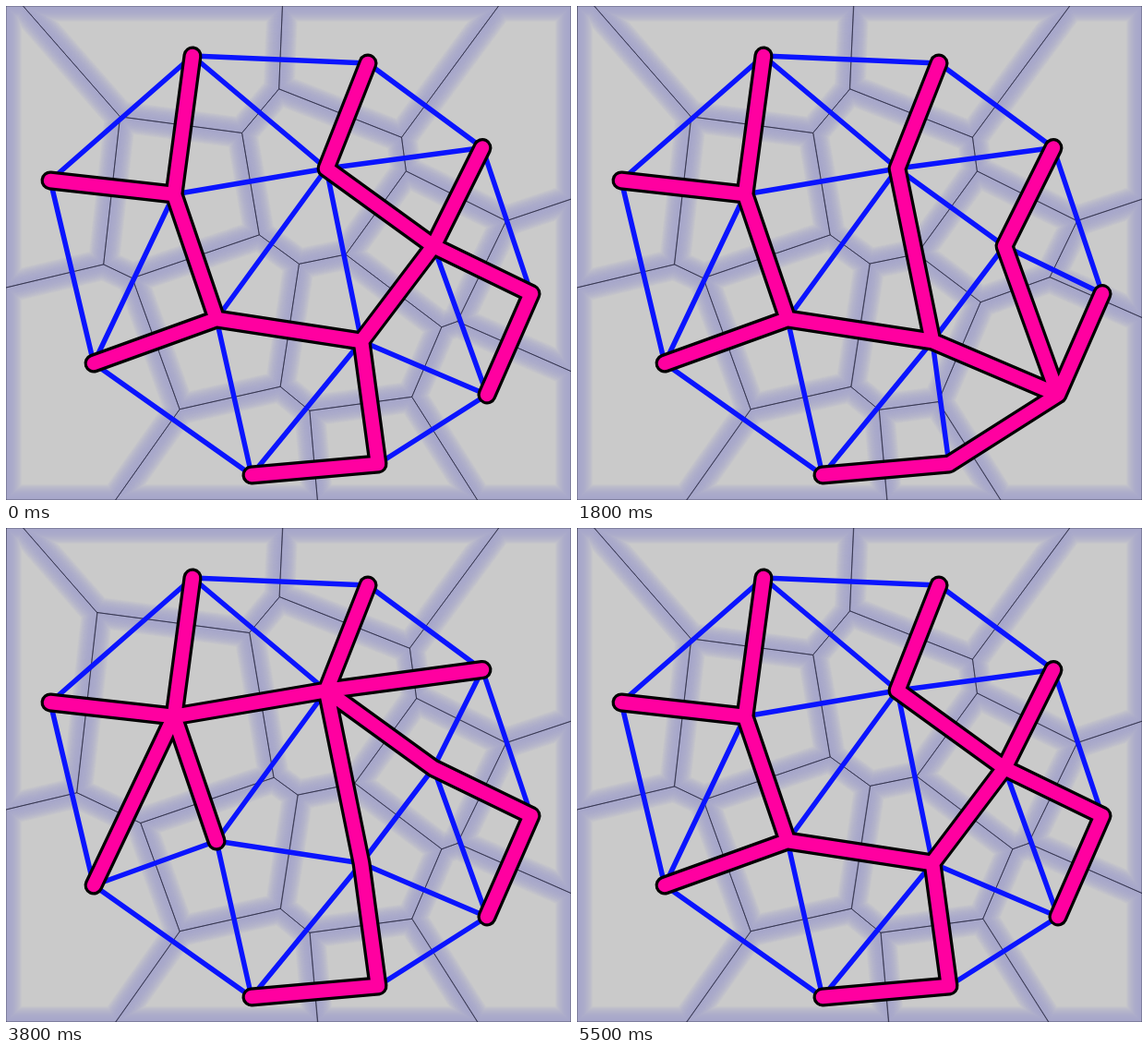
An HTML page with a canvas that plays this animation: 612x535 px, repeating every 6100 ms.

```html
<!DOCTYPE html>
<html lang="en">
<head>
<meta charset="utf-8">
<title>Weighted Voronoi cells with spanning tree</title>
<style>
  html, body { margin: 0; width: 100%; height: 100%; overflow: hidden; background: #cacaca; }
  canvas { display: block; }
</style>
</head>
<body>
<canvas id="stage" width="612" height="535"></canvas>
<script>
const W = 612, H = 535, LOOP = 6100, LAST_STEP = 53;
const ctx = document.getElementById('stage').getContext('2d');

const sites = [
  [202, 54], [392, 62], [516, 153.5], [569, 311.5], [521, 421], [403, 496], [266, 508],
  [95, 387], [48, 189], [182, 204], [347, 176], [463, 260], [385, 363], [228, 339]
];

// Each pulse swells one site: first step, length in steps, peak weight.
const pulses = [
  { site: 5, start: 0, span: 17.3, peak: 8500 },
  { site: 4, start: 8, span: 17.5, peak: 12950 },
  { site: 12, start: 15.3, span: 19.9, peak: 11500 },
  { site: 9, start: 23.2, span: 19.1, peak: 10150 },
  { site: 10, start: 31.4, span: 21.2, peak: 8900 }
];

function weightsAt(step) {
  const w = sites.map(() => 0);
  for (const p of pulses) {
    const u = (step - p.start) / p.span;
    if (u > 0 && u < 1) w[p.site] = p.peak * Math.sin(Math.PI * u) ** 2;
  }
  return w;
}

const dist2 = (a, b) => (a[0] - b[0]) ** 2 + (a[1] - b[1]) ** 2;

// Cuts a polygon by f(point) <= 0; every corner keeps the owner of the side leaving it.
function cut(poly, f, owner) {
  const out = [];
  poly.forEach((p, i) => {
    const q = poly[(i + 1) % poly.length];
    const fp = f(p), fq = f(q);
    if (fp <= 0) out.push(p);
    if ((fp <= 0) !== (fq <= 0)) {
      const s = fp / (fp - fq);
      out.push({
        x: p.x + s * (q.x - p.x),
        y: p.y + s * (q.y - p.y),
        owner: fp <= 0 ? owner : p.owner
      });
    }
  });
  return out;
}

function powerCell(i, w) {
  let poly = [[0, 0], [W, 0], [W, H], [0, H]].map(([x, y]) => ({ x, y, owner: -1 }));
  const a = sites[i];
  sites.forEach((b, j) => {
    if (j === i) return;
    const f = p => dist2([p.x, p.y], a) - w[i] - dist2([p.x, p.y], b) + w[j];
    poly = cut(poly, f, j);
  });
  return poly;
}

// Neighbouring cells give the edges of the triangulation.
function dualEdges(cells) {
  const edges = [];
  cells.forEach((cell, i) => cell.forEach((p, n) => {
    const q = cell[(n + 1) % cell.length];
    if (p.owner > i && Math.hypot(p.x - q.x, p.y - q.y) > 0.01) edges.push([i, p.owner]);
  }));
  return edges;
}

// Kruskal; edges at swollen sites come first, then the shorter ones.
function spanningTree(edges, w) {
  const cost = ([a, b]) => dist2(sites[a], sites[b]) - 1e4 * (w[a] + w[b]);
  const group = sites.map((_, i) => i);
  const find = i => group[i] === i ? i : find(group[i]);
  return [...edges].sort((e, f) => cost(e) - cost(f)).filter(([a, b]) => {
    const ra = find(a), rb = find(b);
    group[ra] = rb;
    return ra !== rb;
  });
}

function drawCell(cell) {
  const path = new Path2D();
  cell.forEach(p => path.lineTo(p.x, p.y));
  path.closePath();
  ctx.save();
  ctx.clip(path);
  ctx.strokeStyle = 'rgba(155,155,200,0.1)';
  ctx.lineJoin = 'round';
  for (let width = 34; width > 4; width -= 2) {
    ctx.lineWidth = width;
    ctx.stroke(path);
  }
  ctx.restore();
  return path;
}

function drawEdges(edges, color, width) {
  ctx.strokeStyle = color;
  ctx.lineWidth = width;
  ctx.lineCap = 'round';
  ctx.beginPath();
  for (const [a, b] of edges) {
    ctx.moveTo(...sites[a]);
    ctx.lineTo(...sites[b]);
  }
  ctx.stroke();
}

function draw(step) {
  const w = weightsAt(step);
  const cells = sites.map((_, i) => powerCell(i, w));
  const edges = dualEdges(cells);
  const tree = spanningTree(edges, w);

  ctx.fillStyle = '#cacaca';
  ctx.fillRect(0, 0, W, H);
  const outlines = cells.map(drawCell);
  ctx.strokeStyle = '#202038';
  ctx.lineWidth = 0.6;
  outlines.forEach(path => ctx.stroke(path));

  drawEdges(edges, '#0a14ff', 5.5);
  drawEdges(tree, '#000', 21);
  drawEdges(tree, '#ff00a0', 14.5);
}

let shown = -1;
function tick(now) {
  const t = now % LOOP;
  const step = Math.max(0, Math.min(LAST_STEP, Math.floor((t - 200) / 100)));
  if (step !== shown) draw(shown = step);
  requestAnimationFrame(tick);
}
tick(performance.now());
</script>
</body>
</html>
```
